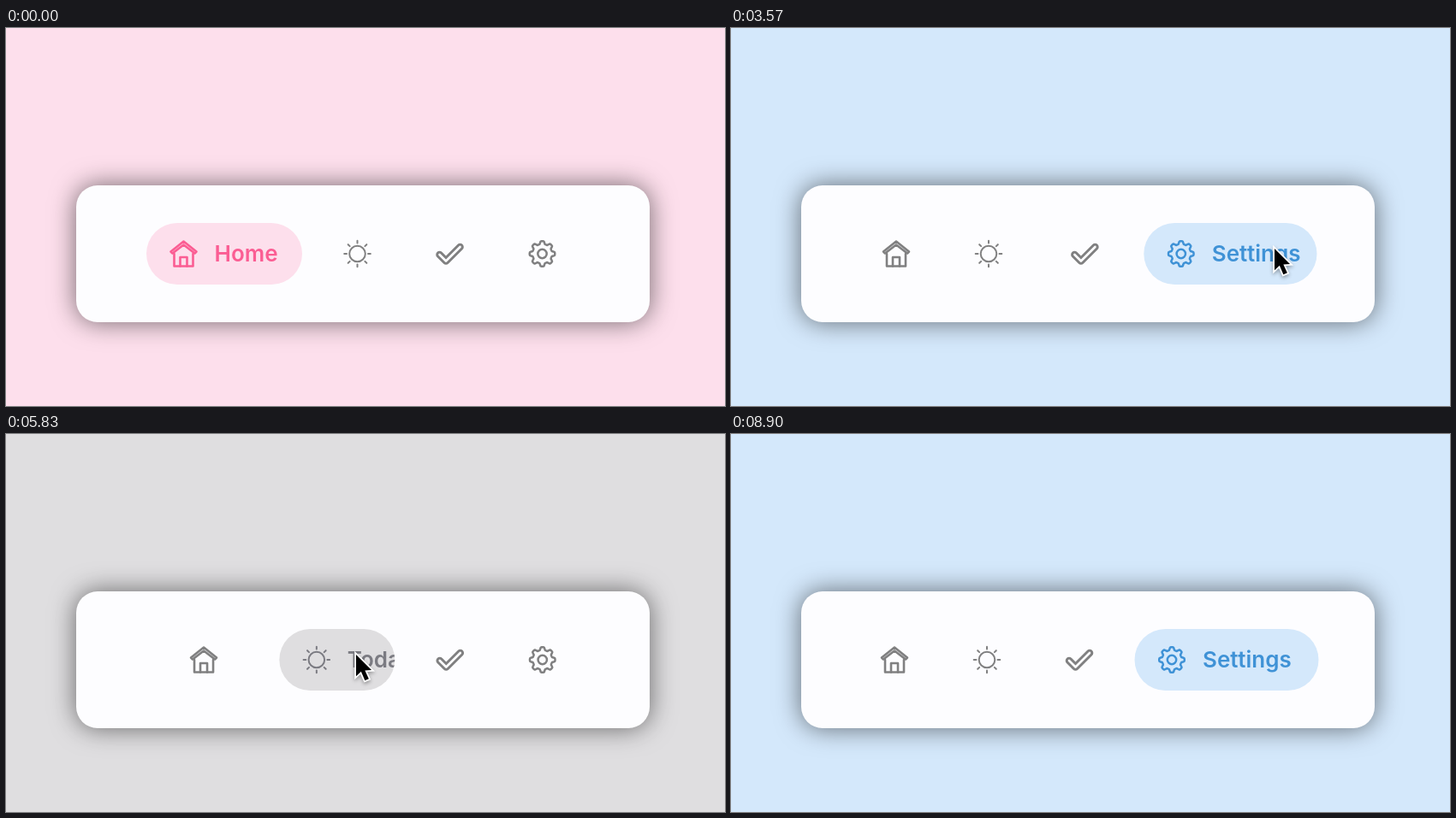
An HTML page with a canvas for the animation above (8930 ms loop, 840 by 442 pixels).

```html
<!DOCTYPE html>
<html lang="en">
<head>
<meta charset="utf-8">
<title>Tab bar</title>
<style>
  html, body { margin: 0; width: 100%; height: 100%; overflow: hidden; }
  canvas { display: block; }
</style>
</head>
<body>
<canvas id="stage" width="840" height="442"></canvas>
<script>
const ctx = document.getElementById('stage').getContext('2d');
const LOOP = 8930, MORPH = 500;
const CENTER = { x: 417, y: 264 };
const COLLAPSED = 87, GAP = 21, PILL_H = 72;
const IDLE = '#808081', WHITE = '#fdfdff';
const STAY = 350, PACE = 2.4; // pointer rest after a click in ms, travel in ms per pixel

// aim: where the pointer tip clicks the tab
const home = { label: 'Home', width: 182, bg: '#fddfec', ink: '#fb5d93', icon: house, aim: [193, 258] };
const today = { label: 'Today', width: 183, bg: '#dfdee0', ink: '#7b7b82', icon: sun, aim: [409, 258] };
const done = { label: 'Done', width: 175, bg: '#fce2e6', ink: '#f3696c', icon: check, aim: [529, 251] };
const settings = { label: 'Settings', width: 215, bg: '#d4e8fb', ink: '#3f92d6', icon: gear, aim: [635, 258] };
const tabs = [home, today, done, settings];

const clicks = [
  { t: 1493, tab: today }, { t: 2530, tab: done }, { t: 3400, tab: settings },
  { t: 4800, tab: home }, { t: 5760, tab: today }, { t: 6464, tab: done },
  { t: 7150, tab: settings, stay: 900 }
];
const stops = [
  { t: 0, aim: [470, -50] },
  ...clicks.map(c => ({ ...c, aim: c.tab.aim })),
  { t: LOOP, aim: [800, 460] }
];

const clamp = v => Math.max(0, Math.min(1, v));
const mix = (a, b, k) => a + (b - a) * k;
const smooth = k => k * k * (3 - 2 * k);

function backOut(k) {
  const s = 1.25, u = k - 1;
  return 1 + (s + 1) * u ** 3 + s * u * u;
}

function fillRound(x, y, w, h, r, color) {
  ctx.fillStyle = color;
  ctx.beginPath();
  ctx.roundRect(x, y, w, h, r);
  ctx.fill();
}

function strokeLine(points, close) {
  ctx.beginPath();
  points.forEach(([x, y]) => ctx.lineTo(x, y));
  if (close) ctx.closePath();
  ctx.stroke();
}

function ring(r) {
  ctx.beginPath();
  ctx.arc(0, 0, r, 0, Math.PI * 2);
  ctx.stroke();
}

function house() {
  const roof = [[0, -14.5], [15, -2.5], [13, -0.5], [0, -10.5], [-13, -0.5], [-15, -2.5]];
  const arch = (half, top) => [[-half, 14.5], [-half, top], [half, top], [half, 14.5]];
  ctx.lineWidth = 2.6;
  strokeLine(roof, true);
  strokeLine([[-11, 0], [-11, 14.5], [11, 14.5], [11, 0]]);
  strokeLine(arch(4, 4));
}

function sun() {
  ctx.lineWidth = 2;
  ring(9.3);
  for (let i = 0; i < 8; i++) {
    const c = Math.cos(i * Math.PI / 4), s = Math.sin(i * Math.PI / 4);
    strokeLine([[c * 12.5, s * 12.5], [c * 15.3, s * 15.3]]);
  }
}

function check(ink, fill) {
  const path = [[-12, 1], [-4.5, 8.5], [12, -8]];
  ctx.lineWidth = 8.6;
  strokeLine(path);
  ctx.strokeStyle = fill;
  ctx.lineWidth = 2.6;
  strokeLine(path);
}

function gear() {
  ctx.lineWidth = 2.5;
  const edge = Array.from({ length: 96 }, (_, i) => {
    const a = i * Math.PI / 48;
    const r = 13.1 + 1.7 * Math.tanh(2.5 * Math.cos(8 * a));
    return [r * Math.cos(a), r * Math.sin(a)];
  });
  strokeLine(edge, true);
  ring(5.2);
}

function drawBackdrop(color) {
  ctx.fillStyle = color;
  ctx.fillRect(0, 0, 840, 442);
  ctx.save();
  ctx.shadowColor = 'rgba(0,0,0,.55)';
  ctx.shadowBlur = 30;
  fillRound(82, 184, 670, 160, 25, WHITE);
  ctx.restore();
}

function drawTab(tab, x, width, active) {
  const iconX = active ? x + COLLAPSED / 2 : x + width / 2;
  const ink = active ? tab.ink : IDLE;
  ctx.save();
  if (active) {
    fillRound(x, CENTER.y - PILL_H / 2, width, PILL_H, PILL_H / 2, tab.bg);
    ctx.clip();
    ctx.fillStyle = ink;
    ctx.font = '600 26px Inter, sans-serif';
    ctx.fillText(tab.label, iconX + 36, 273);
  }
  ctx.translate(iconX, CENTER.y);
  ctx.strokeStyle = ink;
  ctx.lineCap = ctx.lineJoin = 'round';
  tab.icon(ink, active ? tab.bg : WHITE);
  ctx.restore();
}

// Each leg starts after a rest; moves to the left swing through the lower stage.
function pointerAt(t) {
  const i = stops.findLastIndex(s => t >= s.t + (s.stay ?? STAY));
  if (i < 0) return stops[0].aim;
  const from = stops[i], to = stops[i + 1];
  if (!to) return from.aim;
  const [x0, y0] = from.aim, [x1, y1] = to.aim;
  const distance = Math.hypot(x1 - x0, y1 - y0);
  const start = from.t + (from.stay ?? STAY);
  const k = smooth(clamp((t - start) / Math.min(distance * PACE, to.t - 60 - start)));
  const sag = x1 < x0 && i > 0 ? 0.35 * distance * Math.sin(Math.PI * k) : 0;
  return [mix(x0, x1, k), mix(y0, y1, k) + sag];
}

function drawPointer(t) {
  ctx.save();
  ctx.translate(...pointerAt(t));
  ctx.scale(0.9, 0.9);
  ctx.beginPath();
  [[0, 0], [0, 28], [6.5, 22], [11.5, 33.5], [16.5, 31.5], [11.5, 20.5], [20, 20]]
    .forEach(([x, y]) => ctx.lineTo(x, y));
  ctx.closePath();
  ctx.lineWidth = 4;
  ctx.strokeStyle = '#fff';
  ctx.shadowColor = 'rgba(0,0,0,.35)';
  ctx.shadowBlur = 4;
  ctx.shadowOffsetY = 2;
  ctx.stroke();
  ctx.shadowColor = 'transparent';
  ctx.fillStyle = '#000';
  ctx.fill();
  ctx.restore();
}

function draw(t) {
  const step = clicks.findLastIndex(c => c.t <= t);
  const current = clicks[step]?.tab ?? home;
  const previous = clicks[step - 1]?.tab ?? home;
  const p = step < 0 ? 1 : backOut(clamp((t - clicks[step].t) / MORPH));

  const widths = tabs.map(tab => {
    const share = tab === current ? p : tab === previous ? 1 - p : 0;
    return mix(COLLAPSED, tab.width, share);
  });
  const total = widths.reduce((a, b) => a + b) + GAP * (tabs.length - 1);

  drawBackdrop(current.bg);
  let x = CENTER.x - total / 2;
  tabs.forEach((tab, i) => {
    drawTab(tab, x, widths[i], tab === current);
    x += widths[i] + GAP;
  });
  drawPointer(t);
}

const began = performance.now();
function frame() {
  draw((performance.now() - began) % LOOP);
  requestAnimationFrame(frame);
}
frame();
</script>
</body>
</html>
```
